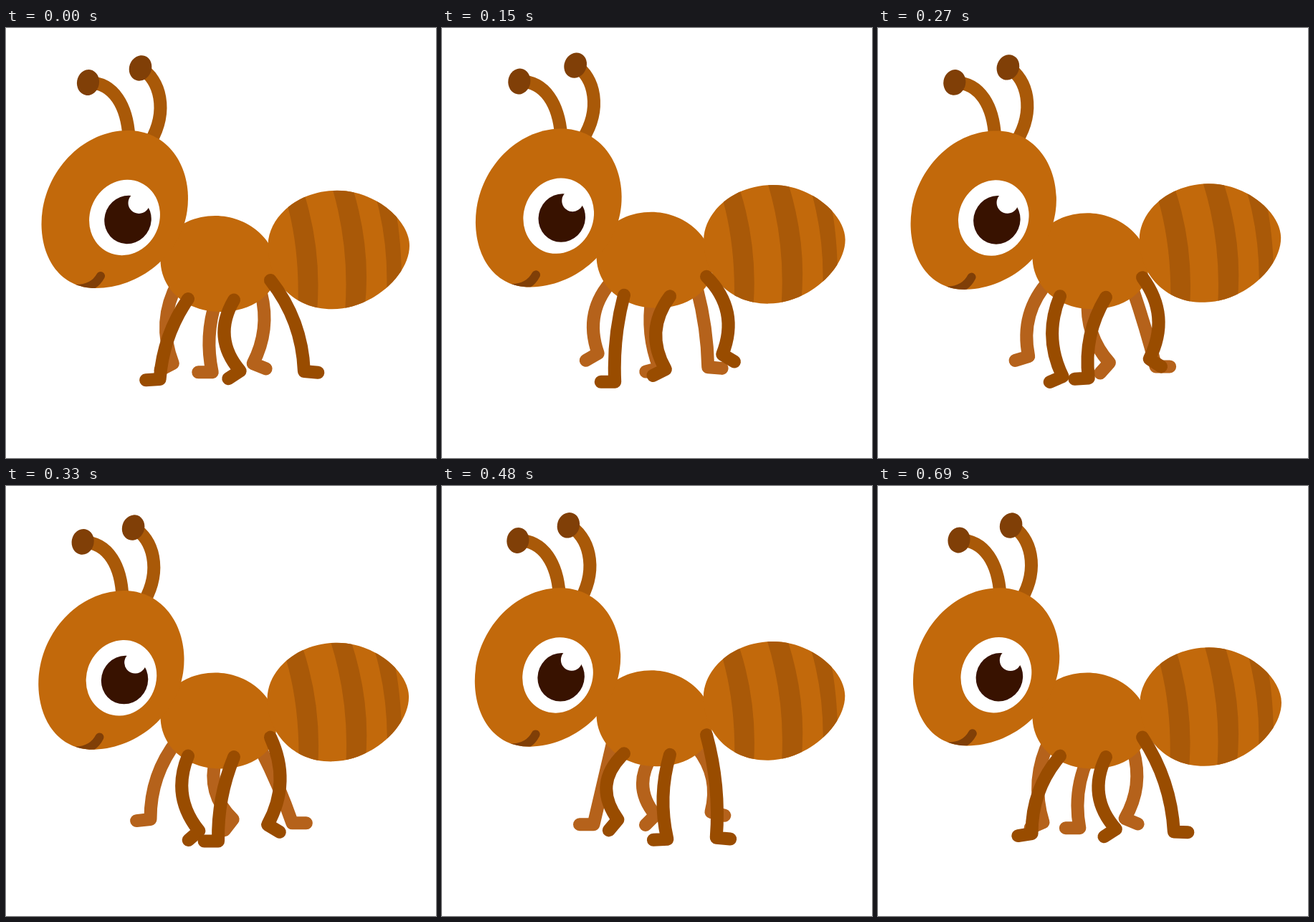
Recreate the animation shown at these times as an HTML page. Size 600 px wide and 600 px high, loop 720 ms.

```html
<!DOCTYPE html>
<html lang="en">
<head>
<meta charset="utf-8">
<title>Walking ant</title>
<style>
  html, body { margin: 0; width: 100%; height: 100%; overflow: hidden; background: #fff; }
  svg { display: block; width: 100vw; height: 100vh; }
  .skin { fill: #c2690b; }
  .dark { fill: #803f07; }
  .line { fill: none; stroke-width: 18; stroke-linecap: round; stroke-linejoin: round; }
  .feeler { stroke: #a95908; }
  #far { stroke: #b5621b; }
  #near { stroke: #994c00; }
</style>
</head>
<body>
<svg viewBox="0 0 600 600">
  <defs>
    <path id="skull" d="M49.5 273C49.5 205 104 143 170 143C222 143 254 186 254 238C254 310 190 363 125 363C76 363 49.5 322 49.5 273Z"/>
    <path id="egg" d="M365.5 301C367 262 408 226 462 226C516 226 563 268 563 303C563 343 512 391.5 455 391.5C400 391.5 364 350 365.5 301Z"/>
    <clipPath id="inSkull"><use href="#skull"/></clipPath>
    <clipPath id="inEgg"><use href="#egg"/></clipPath>
  </defs>

  <g id="far" class="line"></g>
  <path id="thorax" class="skin" d="M215.5 323C215.5 288 250 262 292 262C338 262 380 297 377 340C377 372 342 396 300 396C250 396 215.5 364 215.5 323Z"/>

  <g id="abdomen">
    <use href="#egg" class="skin"/>
    <g clip-path="url(#inEgg)" fill="#a95908">
      <path d="M391 240Q411 310 407 395H434Q441 310 416 230Z"/>
      <path d="M454.5 220Q480 305 473 395H500Q511 310 483 220Z"/>
      <path d="M516 235Q534 300 531 370H552Q553 300 543 250Z"/>
    </g>
  </g>

  <g id="head">
    <g id="feelerL">
      <path class="line feeler" d="M114.5 76C151 76 169 110 171.500 152"/>
      <ellipse class="dark" rx="15.5" ry="18" transform="translate(114.5 76) rotate(10)"/>
    </g>
    <g id="feelerR">
      <path class="line feeler" d="M187 56C215 72 226 115 202 158"/>
      <ellipse class="dark" rx="15.5" ry="18" transform="translate(187 56) rotate(20)"/>
    </g>
    <use href="#skull" class="skin"/>
    <ellipse rx="48.5" ry="53.5" fill="#fff" transform="translate(165.5 264.5) rotate(25)"/>
    <ellipse rx="32.5" ry="34" fill="#381200" transform="translate(170 267.5) rotate(25)"/>
    <circle cx="185.5" cy="244" r="15" fill="#fff"/>
    <path clip-path="url(#inSkull)" d="M132 346Q122 364 98 364" fill="none" stroke="#803f07" stroke-width="12" stroke-linecap="round"/>
  </g>

  <g id="near" class="line"></g>
</svg>
<script>
const LOOP = 720, STEP = 30, FOOT = 19.5;
const LEFT = -1, RIGHT = 1;
const $ = id => document.getElementById(id);

const wave = t => Math.cos(2 * Math.PI * t / LOOP);
const swell = t => (1 + wave(t)) / 2;                    // 1 at t = 0, 0 half a loop away
const sweep = t => (wave(t) + wave(3 * t) / 4) / 1.25;   // lingers midway, quick at both ends
const arc = (t, span) => Math.abs(Math.sin(Math.PI * t / span));
const smooth = u => u * u * (3 - 2 * u);

// mid, stride, back: centre, reach and rearmost time of the sideways swing.
// down, lift, top: lowest foot, height and time of the lift.
// turn, dip: how far (degrees) and when the toe points down.
const legs = [
  { layer: 'far', side: LEFT, hip: [240, 355], mid: -24, stride: 17, back: 10, down: 123, lift: 19, top: 175, turn: 30, dip: 100 },
  { layer: 'far', side: LEFT, hip: [293, 381], mid: 6, stride: 24, back: 275, down: 101, lift: 19, top: 430, turn: 52, dip: 365 },
  { layer: 'far', side: RIGHT, hip: [356, 370], mid: 16, stride: 28, back: 345, down: 109, lift: 21, top: 545, turn: 23, dip: 640 },
  { layer: 'near', side: LEFT, hip: [254, 378], mid: -12, stride: 28, back: 345, down: 121, lift: 29, top: 495, turn: 50, dip: 455 },
  { layer: 'near', side: LEFT, hip: [318, 379.5], mid: -4, stride: 21, back: 650, down: 120, lift: 22, top: 50, turn: 33, dip: 20 },
  { layer: 'near', side: RIGHT, hip: [369, 352], mid: 20, stride: 27, back: 5, down: 146, lift: 38, top: 180, turn: 33, dip: 240 }
];
for (const leg of legs) {
  leg.path = document.createElementNS('http://www.w3.org/2000/svg', 'path');
  $(leg.layer).append(leg.path);
}

// The shorter the way from hip to ankle, the more the leg bows outward.
function legShape(leg, t, bob) {
  const { side, hip: [hx, hy] } = leg;
  const x = leg.mid + leg.stride * sweep(t - leg.back);
  const y = leg.down - leg.lift * swell(t - leg.top);
  const chord = Math.hypot(x, y);
  const slack = Math.sqrt(Math.max(0, (leg.down + 2) ** 2 - chord ** 2));
  const bow = side * slack * (side === LEFT ? .5 : .37) / chord;
  const tilt = leg.turn * smooth(swell(t - leg.dip)) * Math.PI / 180;
  const toe = [side * FOOT * Math.cos(tilt), FOOT * Math.sin(tilt)];
  return `M${hx} ${hy + bob}q${x / 2 + bow * y} ${y / 2 - bow * x} ${x} ${y}l${toe}`;
}

function place(id, x, y, turn = 0, px = 0, py = 0) {
  $(id).setAttribute('transform', `translate(${x} ${y}) rotate(${turn} ${px} ${py})`);
}

function draw(t) {
  const bob = -5.4 * arc(t, LOOP / 2);
  const nod = arc(t, LOOP);
  const wag = nod * nod;
  place('thorax', 0, bob);
  place('head', -5 * nod, bob + 5.2 * nod, -2.1 * nod, 152, 253);
  place('abdomen', -.8 * wag, bob + .8 - 6.8 * wag, -1.4 * wag, 462, 308);
  place('feelerL', 0, 0, 3.4 * swell(t - 345) ** 3, 171, 145);
  place('feelerR', 0, 0, 4.4 * swell(t - 200) ** 3, 204, 155);
  for (const leg of legs) leg.path.setAttribute('d', legShape(leg, t, bob));
}

const start = performance.now();
function tick() {
  const t = (performance.now() - start) % LOOP;
  draw(Math.floor(t / STEP) * STEP);
  requestAnimationFrame(tick);
}
tick();
</script>
</body>
</html>
```
